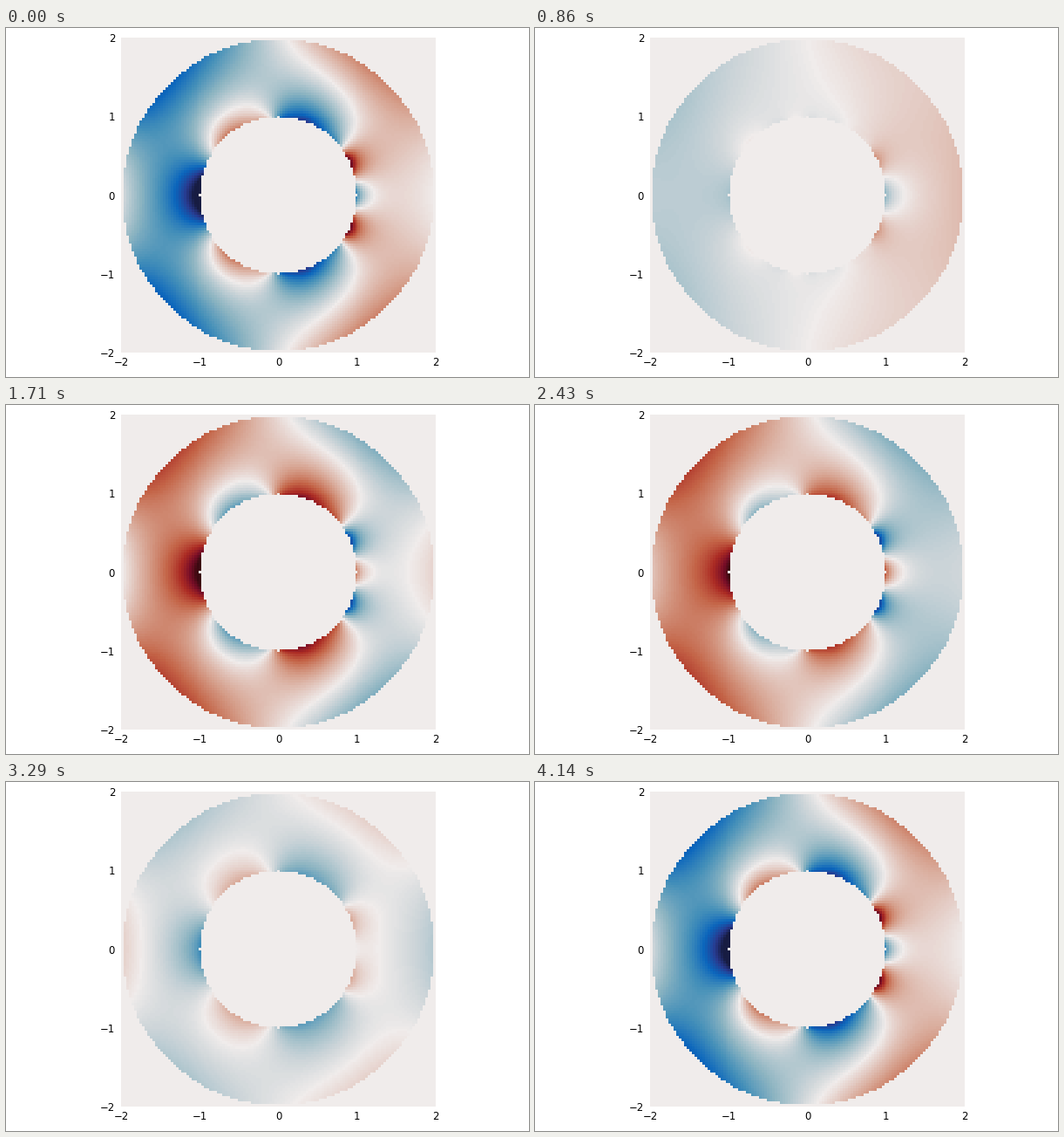
A matplotlib script that plays this animation: 600 px wide and 400 px high, repeating every 4.28 s.

```python
import numpy as np
import matplotlib.pyplot as plt
from matplotlib.animation import FuncAnimation
from matplotlib.colors import LinearSegmentedColormap

LOOP_MS, TICK_MS = 4280, 20
STEPS = 30          # distinct pictures per loop; the last repeats the first
MODES = 24

# Lobes along each rim: angle in degrees -> amplitude, eased in between.
# Each rim has a part in phase with the wave and a part a quarter turn later.
INNER = (
    {0: -.5, 26: .95, 43: -.5, 72: -.82, 84: -.7, 102: .2, 130: .4, 180: -1.25},
    {0: -.13, 50: .2, 75: .18, 115: -.14, 180: .14},
)
OUTER = (
    {0: 0, 52: .36, 138: -.66, 180: -.08},
    {0: .18, 55: 0, 120: .03, 180: -.13},
)

# Diverging blue-white-red map
COLD = ["#171c42", "#293a8f", "#0b66bd", "#4590b9", "#8eb5c2", "#d2d8db"]
WARM = ["#e6d2cc", "#d59d89", "#c46548", "#ac2b24", "#780e28", "#3c0911"]
stops = np.insert(np.linspace(0, 1, 12), 6, 0.5)
balance = LinearSegmentedColormap.from_list(
    "balance", list(zip(stops, COLD + ["#f0eceb"] + WARM)), N=257)


def ease(keys, degrees):
    """Cosine easing through the key angles."""
    angles, values = np.array(list(keys)), np.array(list(keys.values()))
    k = np.clip(np.searchsorted(angles, degrees, "right") - 1, 0, len(angles) - 2)
    t = (degrees - angles[k]) / (angles[k + 1] - angles[k])
    return values[k] + (values[k + 1] - values[k]) * (1 - np.cos(np.pi * t)) / 2


def cosine_series(keys):
    degrees = np.arange(0.125, 180, 0.25)
    waves = np.cos(np.outer(np.arange(MODES), np.radians(degrees)))
    series = 2 * (waves * ease(keys, degrees)).mean(axis=1)
    series[0] /= 2
    return series


def harmonic(inner, outer, r, theta):
    """Smooth field between the rims at r = 1 and r = 2."""
    a, b = cosine_series(inner), cosine_series(outer)
    depth = np.log(r)
    u = a[0] + (b[0] - a[0]) * depth / np.log(2)
    for n in range(1, MODES):
        from_inner = a[n] * np.sinh(n * (np.log(2) - depth))
        from_outer = b[n] * np.sinh(n * depth)
        u += (from_inner + from_outer) / np.sinh(n * np.log(2)) * np.cos(n * theta)
    return u


# Grid of 121 x 121 cells; only the ring between the rims moves
ix, iy = np.meshgrid(np.arange(-60, 61), np.arange(-60, 61))
square = ix ** 2 + iy ** 2
ring = (square > 30 ** 2) & (square < 60 ** 2)
radius = np.sqrt(square[ring]) / 30
theta = np.arctan2(iy[ring], ix[ring])
in_phase, quarter = (harmonic(i, o, radius, theta) for i, o in zip(INNER, OUTER))


def field(step):
    phase = 2 * np.pi * step / (STEPS - 1)
    u = np.zeros(ring.shape)
    u[ring] = in_phase * np.cos(phase) + quarter * np.sin(phase)
    return u


fig = plt.figure(figsize=(6, 4), dpi=100, facecolor="white")
ax = fig.add_axes([132 / 600, 28 / 400, 361 / 600, 361 / 400])
image = ax.imshow(field(0), cmap=balance, vmin=-1, vmax=1, origin="lower",
                  extent=(-2, 2, -2, 2), interpolation="nearest")
ax.set(xticks=range(-2, 3), yticks=range(-2, 3))
ax.tick_params(length=0, pad=5, labelsize=8.4, labelfontfamily="DejaVu Sans")
ax.tick_params(axis="x", pad=3.6)
for spine in ax.spines.values():
    spine.set_visible(False)


def update(i):
    # The picture holds for about 143 ms, so several ticks share a step
    step = int((i * TICK_MS + 12) * STEPS / LOOP_MS)
    image.set_data(field(min(step, STEPS - 1)))
    return [image]


anim = FuncAnimation(fig, update, frames=LOOP_MS // TICK_MS,
                     interval=TICK_MS, repeat=True, repeat_delay=0)
plt.show()
```
